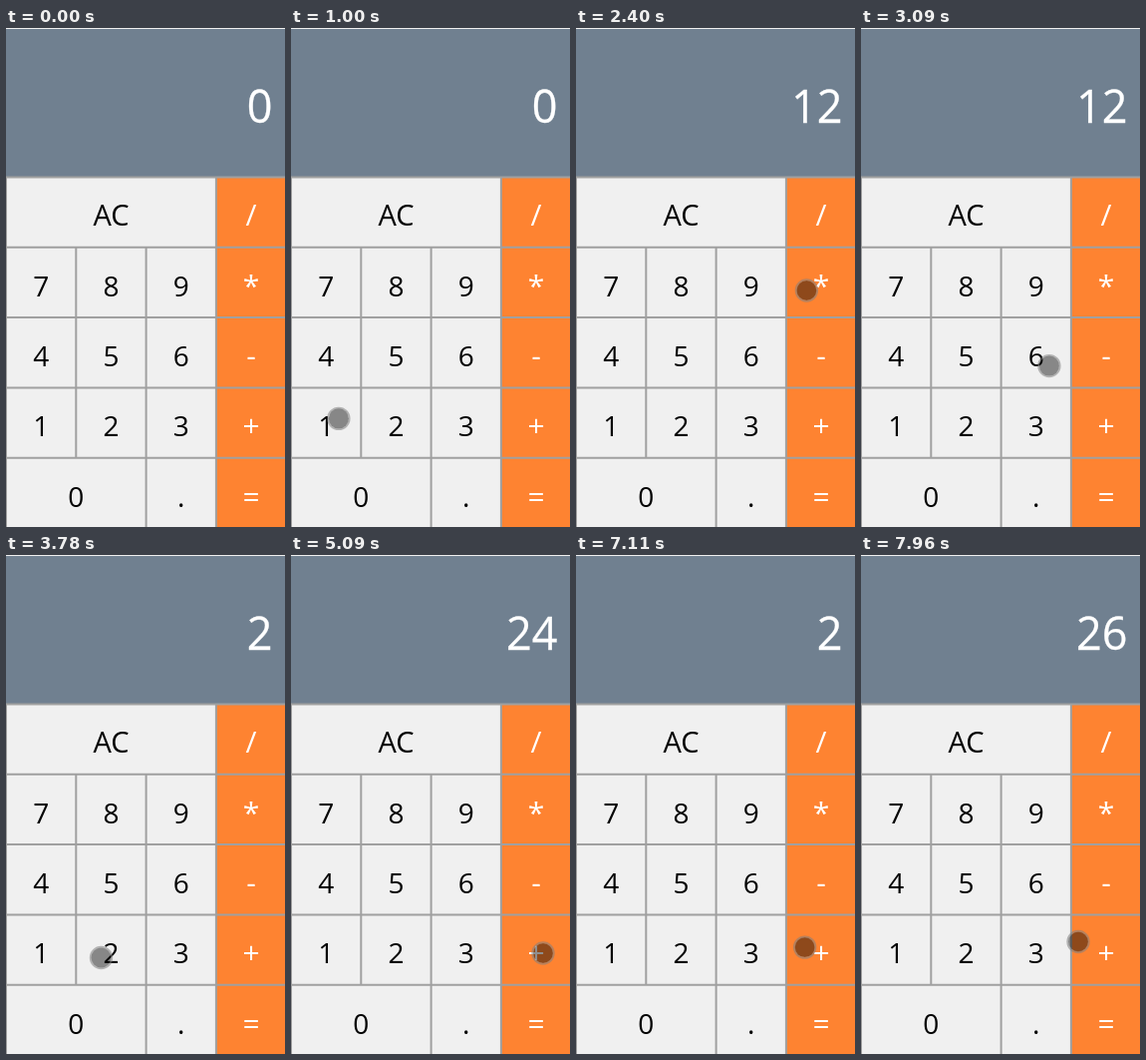
Recreate the animation shown at these times as an HTML page. Size 280 by 500 pixels, loop 8000 ms.

```html
<!DOCTYPE html>
<html lang="en">
<head>
<meta charset="utf-8">
<title>Calculator</title>
<style>
  html, body { margin: 0; height: 100%; overflow: hidden; background: #f0f0f0; }
  svg { display: block; width: 280px; height: 500px; }
  text { font: 28px "Open Sans", "Noto Sans", sans-serif; text-anchor: middle; }
  .operator { font-size: 30px; fill: #fff; }
  .command { font-size: 29px; }
  #display { font-size: 45px; text-anchor: end; fill: #fff; stroke: #fff; stroke-width: .3px; }
  #grid { fill: none; stroke: #a0a0a0; stroke-width: 2px; }
  .press { display: none; }
  .down .press { display: inline; }
  .down .idle { display: none; }
</style>
</head>
<body>
<svg viewBox="0 0 280 500">
  <path fill="#f0f0f0" d="M0 0H280V500H0z"/>
  <path fill="#fe8331" d="M211 149H280V500H211z"/>
  <path fill="#708090" d="M0 1H280V149H0z"/>
  <path id="grid"/>
  <text id="display" x="267.5" y="94.5">0</text>
  <g id="keys"></g>
  <g id="cursor">
    <g class="idle">
      <circle r="10" fill="#000" fill-opacity=".44"/>
      <circle r="10.7" fill="none" stroke="#808080" stroke-opacity=".55" stroke-width="2"/>
    </g>
    <g class="press">
      <circle r="10.5" fill="#b8b800" fill-opacity=".74"/>
      <circle r="11" fill="none" stroke="#d6d650" stroke-opacity=".75" stroke-width="2"/>
    </g>
  </g>
</svg>
<script>
const LOOP = 8000, TICK = 77.4, SHOWN_AT = 530;
const TOP = 149.5, PITCH = 70.3;
const SETTLE = 70, RESPONSE = 65, SAG = 3;
const find = id => document.getElementById(id);
const display = find('display'), cursor = find('cursor');

// A repeated label makes one wide key
const rows = [
  ['AC', 'AC', 'AC', '/'], [...'789*'], [...'456-'], [...'123+'], [...'00.=']
];

function drawKeys() {
  let lines = `M0 ${TOP}V500`, labels = '';
  rows.forEach((row, r) => {
    const y = TOP + r * PITCH;
    lines += `M0 ${y}H280`;
    row.forEach((label, c) => {
      if (label === row[c - 1]) return;
      const x = c * PITCH, span = row.lastIndexOf(label) - c + 1;
      const kind = c === 3 ? 'operator' : label === 'AC' ? 'command' : 'digit';
      if (c) lines += `M${x} ${y}v${PITCH}`;
      labels += `<text class="${kind}" x="${x + span * PITCH / 2}" y="${y + 48.8}">${label}</text>`;
    });
  });
  find('grid').setAttribute('d', lines);
  find('keys').innerHTML = labels;
}

const origin = [77.5, 461.5];
const clicks = [
  { key: '1', depart: 610, down: 1150, up: 1300, at: [46, 382] },
  { key: '2', depart: 1300, down: 1700, up: 1855, at: [96.5, 398] },
  { key: '*', depart: 1850, down: 2570, up: 2720, at: [239, 247] },
  { key: '2', depart: 2870, down: 3620, up: 3775, at: [95.5, 403.5] },
  { key: '+', depart: 4165, down: 4860, up: 5085, at: [253, 399] },
  { key: '2', depart: 5720, down: 6265, up: 6430, at: [114, 393] },
  { key: '+', depart: 6660, down: 7380, up: 7530, at: [252, 392] },
  { key: '', depart: 7530, down: 8040, up: 8200, at: [218, 387.5] }
];

function resultAt(time) {
  let total = 0, pending = '+', shown = '0', fresh = true;
  for (const { key, up } of clicks) {
    if (time < up - RESPONSE) break;
    if (key >= '0' && key <= '9') {
      shown = fresh ? key : shown + key;
      fresh = false;
    } else {
      total = pending === '*' ? total * shown : total + Number(shown);
      shown = String(total);
      pending = key;
      fresh = true;
    }
  }
  return shown;
}

function ease(u) {
  const v = u ** 0.8;
  return v * v * (3 - 2 * v);
}

// Each move is a quadratic curve that sags toward the lower end
function cursorAt(time) {
  let from = origin;
  for (const { depart, down, at } of clicks) {
    if (time < depart) break;
    const u = (time - depart) / (down - SETTLE - depart);
    if (u < 1) {
      const s = ease(u), r = 1 - s;
      const bend = [(from[0] + at[0]) / 2, Math.max(from[1], at[1]) + SAG];
      return from.map((p, i) => r * r * p + 2 * r * s * bend[i] + s * s * at[i]);
    }
    from = at;
  }
  return from;
}

function render(now) {
  const time = now % LOOP;
  // The pointer moves in coarse, steady steps
  const sampled = Math.floor((time + 21) / TICK) * TICK - 11;
  const [x, y] = cursorAt(sampled);
  cursor.setAttribute('transform', `translate(${x.toFixed(2)} ${y.toFixed(2)})`);
  cursor.style.display = time < SHOWN_AT ? 'none' : '';
  cursor.classList.toggle('down', clicks.some(({ down, up }) => time >= down && time < up));
  display.textContent = resultAt(time);
}

drawKeys();
const began = performance.now();
function frame() {
  render(performance.now() - began);
  requestAnimationFrame(frame);
}
frame();
</script>
</body>
</html>
```
